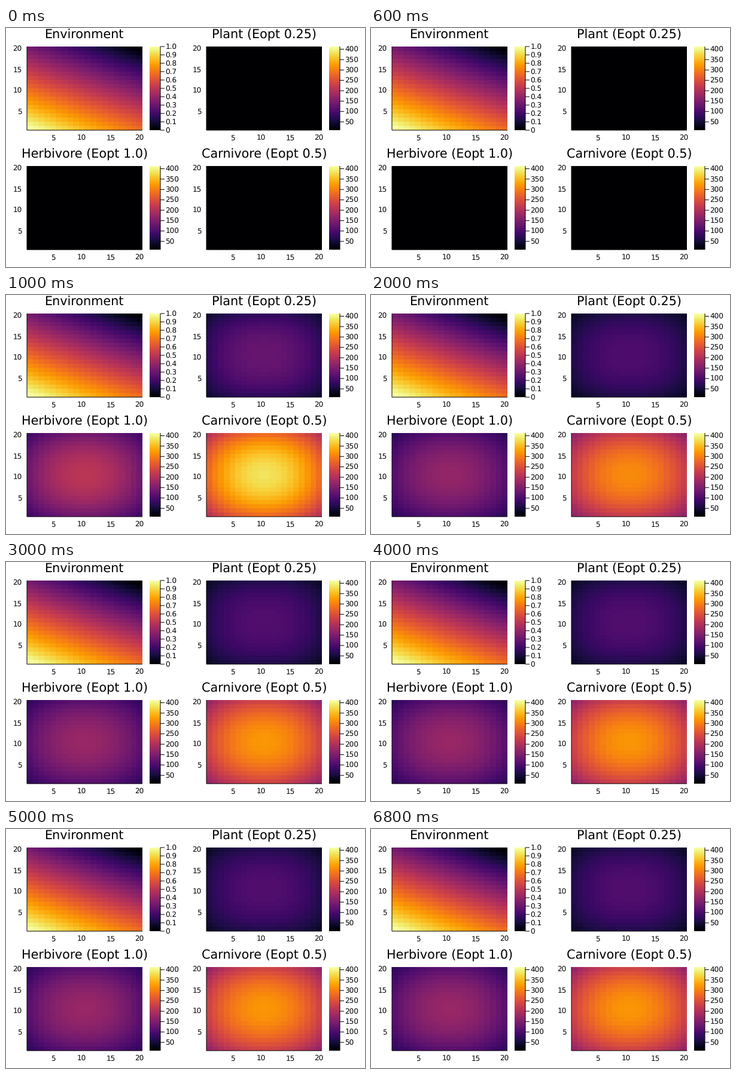
Write a matplotlib script that moves like this. It is 600x400 px and loops after 8 s.

```python
import numpy as np
import matplotlib.pyplot as plt
from matplotlib.animation import FuncAnimation

W, H, DPI = 600, 400, 100
PX = 72 / DPI               # points per pixel
N = 20                      # cells per side
CELL_W, CELL_H = 9.65, 7
MAP_W, MAP_H = N * CELL_W, N * CELL_H
LOW, HIGH = 10, 413         # shared colour limits of the populations

plt.rcParams["font.family"] = "DejaVu Sans"
plt.rcParams["text.hinting"] = "none"
fig = plt.figure(figsize=(W / DPI, H / DPI), dpi=DPI, facecolor="white")
ax = fig.add_axes([0, 0, 1, 1])


def label(x, baseline, text, size, ha="center"):
    ax.text(x, baseline, text, fontsize=size * PX, ha=ha, va="baseline")


def line(x0, y0, x1, y1):
    ax.plot([x0, x1], [y0, y1], color="black", lw=PX, snap=False,
            solid_capstyle="butt")


def colorbar(x, top, low, high, ticks, names):
    ramp = np.linspace(0, 1, 256)[:, None]
    ax.imshow(ramp, cmap="inferno", origin="lower", aspect="auto",
              extent=(x, x + 18, top + MAP_H, top))
    line(x + 18, top, x + 18, top + MAP_H)
    for tick, name in zip(ticks, names):
        y = top + MAP_H * (high - tick) / (high - low)
        line(x + 18, y, x + 25, y)
        label(x + 26.5, y + 4.5, name, 12, "left")


def panel(left, top, title, data, low, high, ticks, names):
    bottom = top + MAP_H
    label(left + MAP_W / 2, top - 13, title, 20.8)
    line(left, top, left, bottom)
    line(left, bottom, left + MAP_W, bottom)
    for k in range(5, N + 1, 5):
        label(left + (k - 0.5) * CELL_W, bottom + 17, str(k), 12)
        label(left - 8.5, bottom - (k - 0.5) * CELL_H + 4.5, str(k), 12, "right")
    colorbar(left + 205, top, low, high, ticks, names)
    return ax.imshow(data, cmap="inferno", vmin=low, vmax=high,
                     origin="lower", aspect="auto", interpolation="nearest",
                     extent=(left, left + MAP_W, bottom, top))


def dome(edge, power):
    """Density relative to the centre, falling to `edge` at each side."""
    u = np.abs(np.linspace(-1, 1, N))
    profile = 1 - (1 - edge) * u ** power
    return np.outer(profile, profile)


def population(peak, shape, step):
    """Overshoots once, then settles in a damped oscillation."""
    if step == 0:
        return np.full((N, N), float(LOW))
    return peak * shape * (1 + 0.2 * (-0.15) ** (step - 1))


s = np.linspace(0, 1, N)
environment = 1 - 0.33 * s[None, :] - 0.67 * s[:, None]
tenths = np.arange(11) / 10
panel(35, 31, "Environment", environment, 0, 1, tenths,
      ["0"] + [f"{v:.1f}" for v in tenths[1:]])

# left, top, title, settled peak, shape
species = [
    (335, 31, "Plant (Eopt 0.25)", 106, dome(0.61, 2.3)),
    (35, 231, "Herbivore (Eopt 1.0)", 176, dome(0.66, 2)),
    (335, 231, "Carnivore (Eopt 0.5)", 320, dome(0.74, 2)),
]
counts = range(50, 401, 50)
maps = [panel(left, top, title, population(peak, shape, 0), LOW, HIGH,
              counts, [str(c) for c in counts])
        for left, top, title, peak, shape in species]

ax.set_xlim(0, W)
ax.set_ylim(H, 0)
ax.axis("off")


def update(i):
    step = min(i, 5)
    for image, (*_, peak, shape) in zip(maps, species):
        image.set_data(population(peak, shape, step))
    return maps


anim = FuncAnimation(fig, update, frames=8, interval=1000, repeat=True,
                     repeat_delay=0)
plt.show()
```
